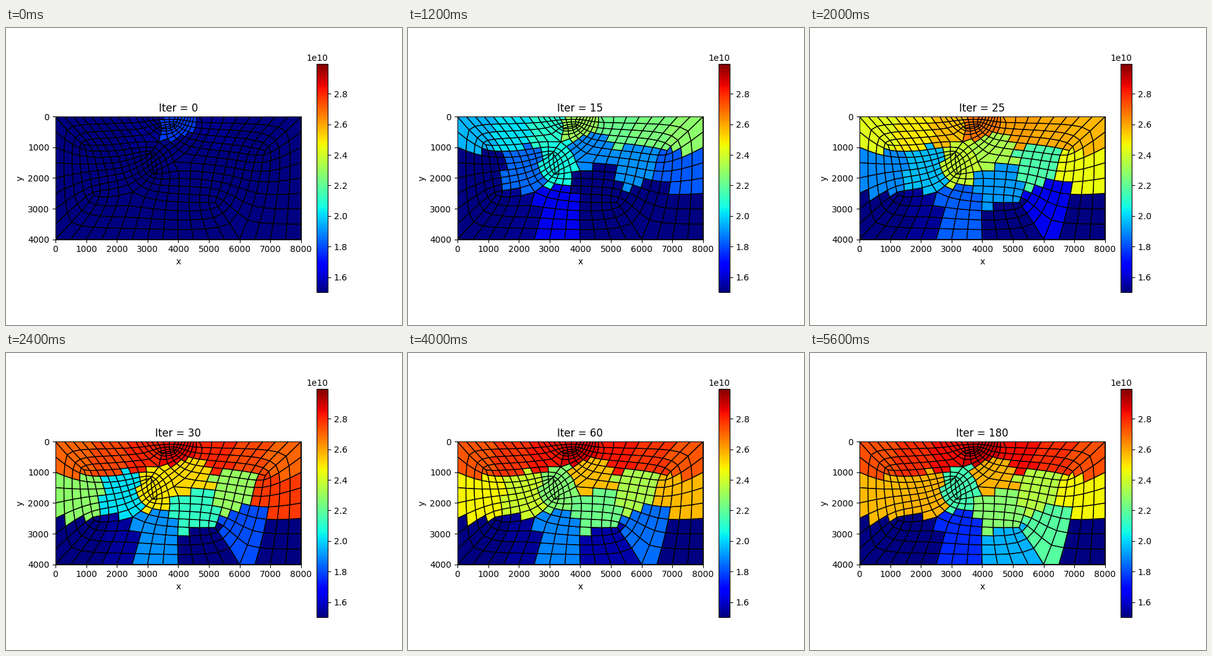
Recreate the animation shown at these times as a matplotlib script. Size 640x480 px, loop 6 s.

```python
import numpy as np
import matplotlib.pyplot as plt
from matplotlib.animation import FuncAnimation
from matplotlib.collections import PolyCollection

LEFT, TOP, SCALE = 80.0, 143.2, 0.0496  # stage pixels per metre
RIGHT, BOTTOM = LEFT + 8000 * SCALE, TOP + 4000 * SCALE
BASE = 1.5  # stiffness of untouched rock, 1e10

# Block corners in stage pixels
corners = dict(
    TL=(LEFT, TOP), TR=(RIGHT, TOP), BL=(LEFT, BOTTOM), BR=(RIGHT, BOTTOM),
    E=(RIGHT, TOP + 2500 * SCALE), b2=(LEFT + 2000 * SCALE, BOTTOM),
    b4=(LEFT + 4000 * SCALE, BOTTOM), K=(LEFT + 6000 * SCALE, BOTTOM),
    TT=(210, TOP), A=(244, TOP), J=(274, TOP), I=(295, TOP), TV=(312, TOP),
    P1=(126, 189), P2=(142, 270), P3=(236, 199), P4=(205, 265),
    P5=(338, 282), P6=(419, 198), P7=(400, 262),
    Q=(178, 195), T=(247, 184), R=(238, 236), U=(271, 216), V=(303, 182),
    W=(368, 243), Y=(360, 187), C=(279, 280),
    B=(250, 162), G=(286, 172), H=(274, 157),
)
corners = {name: np.array(p, float) for name, p in corners.items()}


def between(a, b, t):
    return corners[a] * (1 - t) + corners[b] * t


corners.update(TQ=between("TL", "TT", 4 / 9), TY=between("TR", "TV", 0.5),
               Qm=between("Q", "P4", 0.5), Z=between("C", "U", 0.6),
               W2=between("W", "Y", 0.4))

# Four corners of each block; cell counts follow where they are not 4 by 4
BLOCKS = """
TL BL P2 P1 8 4|TL P1 Q TQ|TQ Q T TT 4 5|BL P2 P4 b2|b2 P4 C b4|b4 C P5 K
K P5 W P7 4 3|K P7 E BR 3 4|E TR P6 P7 5 4|P6 P7 W Y 5 4|TR P6 Y TY
TY Y V TV|P1 P2 P4 Q 8 4|Q Qm P3 T 4 5|Qm P4 R P3 4 5|P3 T U R
P4 C U R 4 5|C P5 W Z 4 3|Z W W2 U 4 2|U W2 Y V 4 3|TT A B T
T U V G 4 3|B T G H 4 3|A B H J 4 3|G V TV I|J H G I
"""


def build_mesh():
    index, nodes, cells = {}, [], []

    def node(p):
        key = tuple(np.round(p, 4))
        if key not in index:
            index[key] = len(nodes)
            nodes.append(p)
        return index[key]

    for block in BLOCKS.strip().replace("\n", "|").split("|"):
        a, b, c, d, *size = block.split()
        a, b, c, d = (corners[k] for k in (a, b, c, d))
        n, m = map(int, size or (4, 4))
        ids = [[node((1 - v) * ((1 - u) * a + u * b) + v * ((1 - u) * d + u * c))
                for v in np.linspace(0, 1, m + 1)]
               for u in np.linspace(0, 1, n + 1)]
        cells += [(ids[i][j], ids[i + 1][j], ids[i + 1][j + 1], ids[i][j + 1])
                  for i in range(n) for j in range(m)]
    return np.array(nodes), np.array(cells)


def smooth(nodes, cells, rounds=10):
    """Relax the regular nodes; the border and irregular nodes stay put."""
    pairs = np.concatenate([cells[:, [k, (k + 1) % 4]] for k in range(4)])
    pairs = np.unique(np.sort(pairs, axis=1), axis=0)
    i, j = np.concatenate([pairs, pairs[:, ::-1]]).T
    degree = np.bincount(i, minlength=len(nodes))
    free = np.bincount(cells.ravel(), minlength=len(nodes)) == 4
    for _ in range(rounds):
        total = np.zeros_like(nodes)
        np.add.at(total, i, nodes[j])
        nodes[free] = (total / degree[:, None])[free]
    return nodes


class Zone:
    """Rock around a seed: ramps to `early` by iteration 30, drifts to `late`."""

    def __init__(self, x, y, early=BASE, late=BASE, onset=0, power=1, start=BASE):
        self.seed = x, y
        self.early, self.late, self.start = early, late, start
        self.onset, self.power = onset, power
        self.drift = 1.3 if y > 270 else 0.25

    def stiffness(self, it):
        ramp = np.clip((it - self.onset) / (30 - self.onset), 0, 1) ** self.power
        drift = max((it - 30) / 150, 0) ** self.drift
        return (self.start + ramp * (self.early - self.start)
                + drift * (self.late - self.early))


def surface_zone(i):
    """Strips under the surface, stiffest in the middle, faster to the right."""
    peak = 2.85 - 0.05 * abs(i - 3)
    return Zone(112 + 56 * i, 150 + 5 * abs(i - 3), peak, peak + 0.04,
                power=1.4 - 0.13 * i,
                start=BASE + 0.28 * np.exp(-(1.6 * (i - 3)) ** 2))


zones = [surface_zone(i) for i in range(7)] + [
    Zone(122, 235, 2.28, 2.57, onset=20),
    Zone(187, 228, 2.02, 2.58, power=0.6),
    Zone(243, 217, 2.50, 2.15, onset=8, power=0.5),
    Zone(295, 197, 2.52, 2.58, onset=10, power=0.7),
    Zone(305, 250, 2.12, 2.27, onset=15),
    Zone(372, 218, 2.30, 2.35),
    Zone(440, 232, 2.77, 2.47, onset=10),
    Zone(241, 294, 1.90, 1.75, onset=10, power=0.7),
    Zone(320, 318, 1.50, 1.95),
    Zone(392, 285, 1.80, 2.18, onset=20),
    Zone(130, 300), Zone(185, 300, 1.54), Zone(447, 305),
]

quads = smooth(*(mesh_parts := build_mesh()))[mesh_parts[1]]
seeds = np.array([z.seed for z in zones])
offsets = quads.mean(axis=1)[:, None] - seeds
owner = np.hypot(*offsets.transpose(2, 0, 1)).argmin(axis=1)

# Steps of 5 that double each time the run slows down
ITERS = [*range(0, 40, 5), *range(40, 60, 10), *range(60, 100, 20),
         *range(100, 181, 40)]

fig, ax = plt.subplots(figsize=(6.4, 4.8), dpi=100)
mesh = PolyCollection((quads - (LEFT, TOP)) / SCALE, cmap="jet",
                      edgecolors="black", linewidths=1)
mesh.set_array(np.zeros(len(quads)))
mesh.set_clim(BASE * 1e10, 2.9975e10)
ax.add_collection(mesh)
ax.set(xlim=(0, 8000), ylim=(4000, 0), aspect="equal", xlabel="x", ylabel="y")
title = ax.set_title("Iter = 0")
fig.colorbar(mesh, ax=ax)


def draw(frame):
    it = ITERS[frame]
    levels = np.array([z.stiffness(it) for z in zones])
    mesh.set_array(levels[owner] * 1e10)
    title.set_text(f"Iter = {it}")
    return mesh, title


anim = FuncAnimation(fig, draw, frames=len(ITERS), interval=400,
                     repeat=True, repeat_delay=0)
plt.show()
```
